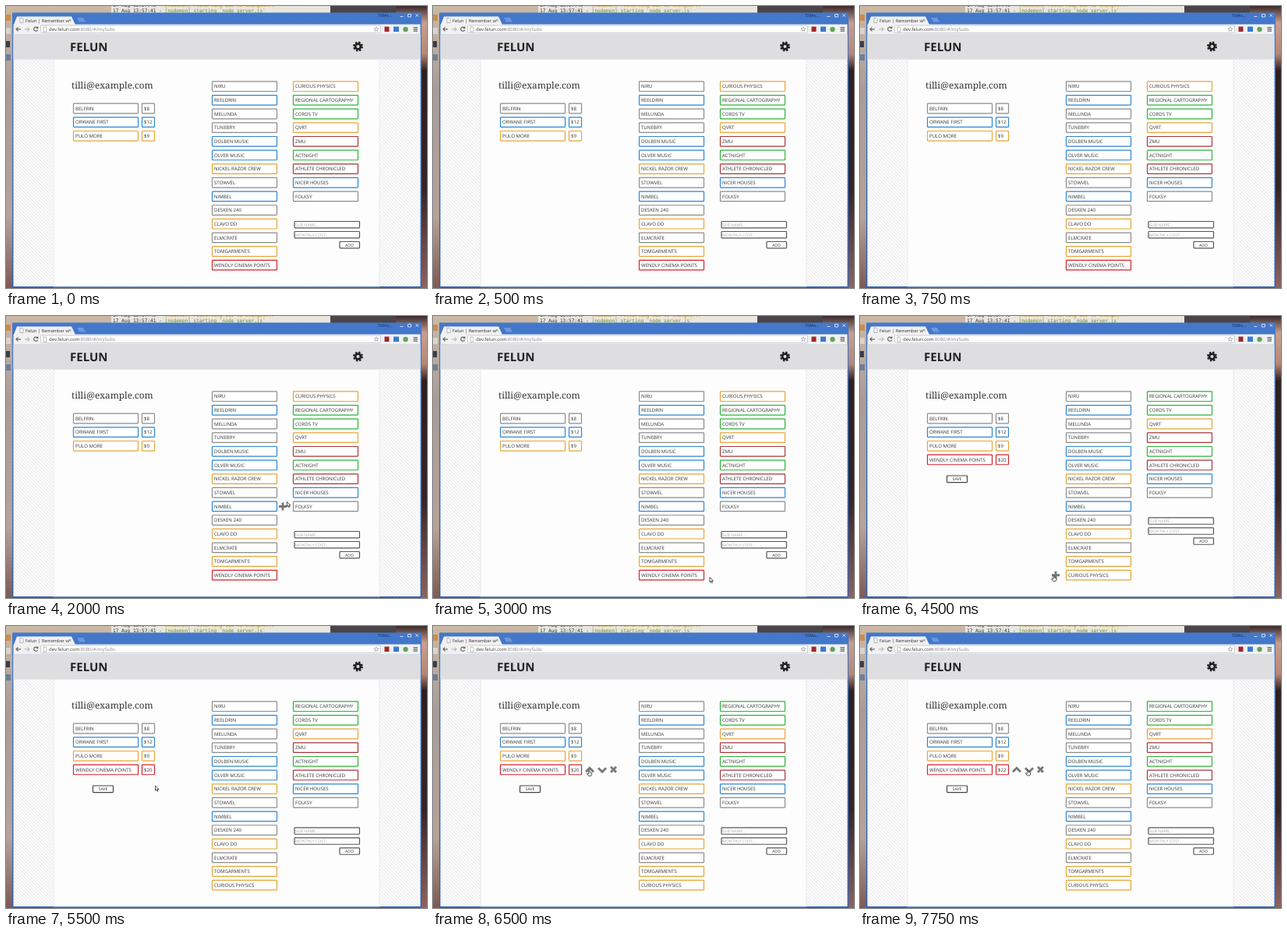
An HTML page that plays this animation: 540x362 px, repeating every 8000 ms.

```html
<!DOCTYPE html>
<html lang="en">
<head>
<meta charset="utf-8">
<title>Felun</title>
<style>
html, body { margin: 0; height: 100%; overflow: hidden; }
svg { display: block; width: 100vw; height: 100vh; text-rendering: geometricPrecision; }
text { font-family: "Open Sans", "Noto Sans", sans-serif; fill: #333; white-space: pre; }
.item { font-size: 6.1px; }
.hint { font-size: 5.2px; fill: #aaa; }
.btn { font-size: 5.2px; text-anchor: middle; }
.mono { font: 6.15px "DejaVu Sans Mono", monospace; }
.icon { fill: none; stroke: #777; stroke-width: 2.8; }
.tool { fill: none; stroke: #666; stroke-width: 1.2; }
</style>
</head>
<body>
<svg viewBox="0 0 540 362" preserveAspectRatio="none">
  <defs>
    <linearGradient id="left" x2="0" y2="1">
      <stop stop-color="#cbb9a6"/><stop offset=".3" stop-color="#a99c98"/>
      <stop offset=".75" stop-color="#b5a29b"/><stop offset="1" stop-color="#7d5a55"/>
    </linearGradient>
    <linearGradient id="right" x2="0" y2="1">
      <stop stop-color="#3a2a2c"/><stop offset=".06" stop-color="#c79f8f"/>
      <stop offset=".17" stop-color="#b58778"/><stop offset=".23" stop-color="#2b2023"/>
      <stop offset=".65" stop-color="#33262a"/><stop offset="1" stop-color="#8a6462"/>
    </linearGradient>
    <linearGradient id="bar" x2="0" y2="1">
      <stop stop-color="#4478cb"/><stop offset="1" stop-color="#2b5db4"/>
    </linearGradient>
    <pattern id="hatch" width="4.4" height="4.4" patternUnits="userSpaceOnUse">
      <path d="M-1-1L5.4 5.4M-1 3.4L1 5.4M3.4-1L5.4 1" stroke="#dedede" stroke-width=".8"/>
    </pattern>
  </defs>

  <!-- desktop -->
  <rect width="540" height="362" fill="url(#left)"/>
  <rect x="415" width="125" height="9" fill="#4a4548"/>
  <rect x="500" width="40" height="362" fill="url(#right)"/>
  <g>
    <rect y="11" width="6" height="8" fill="#c98d4e"/>
    <rect y="28" width="6" height="8" fill="#d9d4cd"/>
    <rect y="45" width="5" height="8" fill="#3b3d4a"/>
    <rect y="62" width="6" height="8" fill="#6c7f98"/>
  </g>
  <rect x="135" width="281" height="9" fill="#e9e6dc"/>
  <text class="mono" x="137" y="1.2">17 Aug 13:57:40 - <tspan fill="#b58a10">[nodemon] restarting due to changes...</tspan></text>
  <text class="mono" x="137" y="8.2">17 Aug 13:57:41 - <tspan fill="#6f8a1c">[nodemon] starting `node server.js`</tspan></text>

  <!-- browser -->
  <rect x="8" y="8.5" width="525" height="353" rx="1" fill="url(#bar)"/>
  <path d="M10 24L14 13.5H84L89 24Z" fill="#f1f1f1"/>
  <path d="M18 15.5h3l1 1v5h-4z" fill="#fff" stroke="#888" stroke-width=".6"/>
  <text x="25" y="20.5" font-size="5.7">Felun | Remember w</text>
  <path d="M80.5 16.8l3 3m0-3l-3 3" stroke="#777" stroke-width=".8"/>
  <path d="M91 15h8l3 5.5h-8z" fill="#6d96d8"/>
  <text x="477" y="14" font-size="5.2" style="fill:#10244d">TilliAs…</text>
  <path d="M505.5 13.5h4M515.5 10.5h4v3.5h-4zM525.5 10.3l3.5 3.5m0-3.5l-3.5 3.5" fill="none" stroke="#dfe9fa" stroke-width=".9"/>
  <rect x="9.5" y="23.5" width="522" height="13" fill="#f1f1f1"/>
  <path class="tool" d="M19 29.8h-6m2.5-2.5l-2.5 2.5l2.5 2.5"/>
  <path class="tool" style="stroke:#bbb" d="M24 29.8h6m-2.5-2.5l2.5 2.5l-2.5 2.5"/>
  <path class="tool" d="M40.3 28a2.6 2.6 0 1 0 .4 2.6M40.8 26.5v2h-2"/>
  <rect x="44.5" y="25" width="436" height="9.5" rx="1" fill="#fff" stroke="#bbb" stroke-width=".7"/>
  <path d="M48 27h3l1 1v5h-4z" fill="#fff" stroke="#888" stroke-width=".6"/>
  <text x="55" y="32" font-size="6">dev.felun.com<tspan fill="#888">:8080/#/mySubs</tspan></text>
  <path d="M475 26.8l.9 2h2.1l-1.7 1.4.7 2.2-2-1.3-2 1.3.7-2.2-1.7-1.4h2.1z" fill="none" stroke="#888" stroke-width=".6"/>
  <rect x="485.5" y="26.5" width="6" height="6.5" fill="#a3262b"/>
  <rect x="497" y="26.5" width="7" height="6.5" fill="#3b78d0"/>
  <circle cx="512.5" cy="30" r="3.2" fill="#63a35c"/>
  <path class="tool" d="M522.5 27.7h5.5m-5.5 2.2h5.5m-5.5 2.2h5.5"/>

  <!-- page -->
  <rect x="9.5" y="36.5" width="522" height="323.5" fill="#fcfcfc"/>
  <rect x="9.5" y="68" width="522" height="292" fill="url(#hatch)"/>
  <rect x="61" y="68" width="418" height="292" fill="#fdfdfd" stroke="#e6e6e6" stroke-width=".8"/>
  <rect x="9.5" y="36.5" width="522" height="32" fill="#dedee0"/>
  <text x="82" y="58" font-size="15" font-weight="700" style="fill:#222">FELUN</text>
  <g fill="none" stroke="#222">
    <circle cx="451.5" cy="52" r="3.4" stroke-width="2.8"/>
    <circle cx="451.5" cy="52" r="5.4" stroke-width="2.2" stroke-dasharray="2.4 1.841"/>
  </g>
  <text x="84" y="106" font-size="11.8" style="font-family:'Noto Serif',serif">tilli@example.com</text>
  <g id="live"></g>
</svg>
<script>
const GRAY = '#8c8c8c', BLUE = '#2d86d4', GOLD = '#e6a537', RED = '#d3232f', GREEN = '#2cb338', WINE = '#a8353b';
const PITCH = 17.65, STEP = 250, LOOP = 8000, CLICK = 4500;

const owned = [['BELFRIN', GRAY, 8], ['ORWANE FIRST', BLUE, 12], ['PULO MORE', GOLD, 9]];
const offers = [
  ['NIRU', GRAY], ['REELDRIN', BLUE], ['MELUNDA', GRAY], ['TUNEBRY', GRAY], ['DOLBEN MUSIC', BLUE],
  ['OLVER MUSIC', BLUE], ['NICKEL RAZOR CREW', GOLD], ['STOWVEL', GRAY], ['NIMBEL', BLUE],
  ['DESKEN 240', GRAY], ['CLAVO DD', GOLD], ['ELMCRATE', GRAY], ['TOMGARMENTS', GOLD],
  ['WENDLY CINEMA POINTS', RED], ['CURIOUS PHYSICS', GOLD], ['REGIONAL CARTOGRAPHY', GREEN],
  ['CORDS TV', GREEN], ['QVRT', GOLD], ['ZMU', WINE], ['ACTNIGHT', GREEN],
  ['ATHLETE CHRONICLED', WINE], ['NICER HOUSES', BLUE], ['FOLKSY', GRAY]
];
const PICK = 13, ROWS = 14;

// pointer: time, x, y
const path = [
  [1250, 500, 64], [1500, 456, 120], [1750, 410, 188], [2000, 360.5, 238.5], [2250, 352, 280],
  [2500, 350.5, 310], [2750, 353, 330], [3000, 355, 335.5], [3250, 335, 335], [3500, 290, 334],
  [3750, 258, 334], [4000, 250, 333], [4750, 248, 333], [5000, 225, 312], [5250, 198, 279],
  [5500, 191.5, 205], [5750, 195, 190], [6000, 200, 185], [7250, 201, 185], [7500, 215.5, 184.5]
];
// price of the added item: time, dollars
const prices = [[0, 20], [6750, 21], [7000, 22], [7250, 23], [7750, 22]];

const box = (x, y, w, h, color) =>
  `<rect x="${x + .5}" y="${y}" width="${w - 1}" height="${h}" rx=".8" fill="#fff" stroke="${color}" stroke-width="1.2"/>`;
const label = (x, y, s, kind) => `<text class="${kind}" x="${x}" y="${y}">${s}</text>`;
const item = (x, y, w, s, color) => box(x, y - 6.2, w, 12.6, color) + label(x + 3, y + 2.3, s, 'item');
const icon = d => `<path class="icon" d="${d}"/>`;

function pointerAt(t) {
  if (t < path[0][0]) return null;
  const i = path.findLastIndex(k => k[0] <= t);
  const [t0, x0, y0] = path[i], [t1, x1, y1] = path[i + 1] || [LOOP, x0, y0];
  const p = (t - t0) / (t1 - t0);
  return { x: x0 + (x1 - x0) * p, y: y0 + (y1 - y0) * p };
}

function draw(t) {
  const mouse = pointerAt(t), added = t >= CLICK;
  const over = (x0, x1, y) => mouse && mouse.x >= x0 && mouse.x <= x1 && Math.abs(mouse.y - y) < PITCH / 2;
  const price = prices.findLast(k => k[0] <= t)[1];
  const mine = added ? [...owned, [...offers[PICK], price]] : owned;
  const rest = added ? offers.filter((_, i) => i !== PICK) : offers;
  let out = '', hand = false;

  mine.forEach(([name, color, cost], i) => {
    const y = 131.4 + i * PITCH;
    out += item(86, y, 84, name, color) + item(174, y, 17, '$' + cost, color);
    if (over(86, 237, y)) {
      out += icon(`M196 ${y + 3}l5-5l5 5`) + icon(`M212 ${y - 2}l5 5l5-5`) + icon(`M228 ${y - 3.7}l7 7m0-7l-7 7`);
      hand = mouse.x > 195;
    }
  });
  if (added) out += box(111, 205, 27, 8.6, '#444') + label(124.5, 211.2, 'SAVE', 'btn');

  rest.forEach(([name, color], i) => {
    const x = i < ROWS ? 264 : 368, y = 103.1 + i % ROWS * PITCH;
    out += item(x, y, 84, name, color);
    if (over(x - 20, x + 84, y)) {
      out += icon(`M${x - 18} ${y + .2}h10m-5-5v10`);
      hand = Math.abs(mouse.x - x + 13) < 5;
    }
  });

  const y = 276.5 - (added ? PITCH : 0);
  out += box(369.5, y, 84.5, 8.4, '#555') + label(371, y + 6, 'SUB NAME...', 'hint')
    + box(369.5, y + 13, 84.5, 8.4, '#555') + label(371, y + 19, 'MONTHLY COST...', 'hint')
    + box(427.5, y + 26, 26.5, 8.4, '#555') + label(440.5, y + 32, 'ADD', 'btn');

  if (mouse) {
    const d = hand
      ? 'M-.7 .5q.7-.8 1.3 0v2.3l2.6.6v2.2l-.8 1.8h-3.4l-2-2.8.7-.6 1.6 1z'
      : 'M0 0v6.2l1.4-1.3 1 2.3 1.1-.5-1-2.2h2z';
    out += `<path transform="translate(${mouse.x} ${mouse.y})" d="${d}" fill="#fff" stroke="#222" stroke-width=".8"/>`;
  }
  document.getElementById('live').innerHTML = out;
}

let last = -1;
const start = performance.now();
function frame() {
  const step = Math.floor((performance.now() - start) % LOOP / STEP);
  if (step !== last) draw((last = step) * STEP);
  requestAnimationFrame(frame);
}
frame();
</script>
</body>
</html>
```
